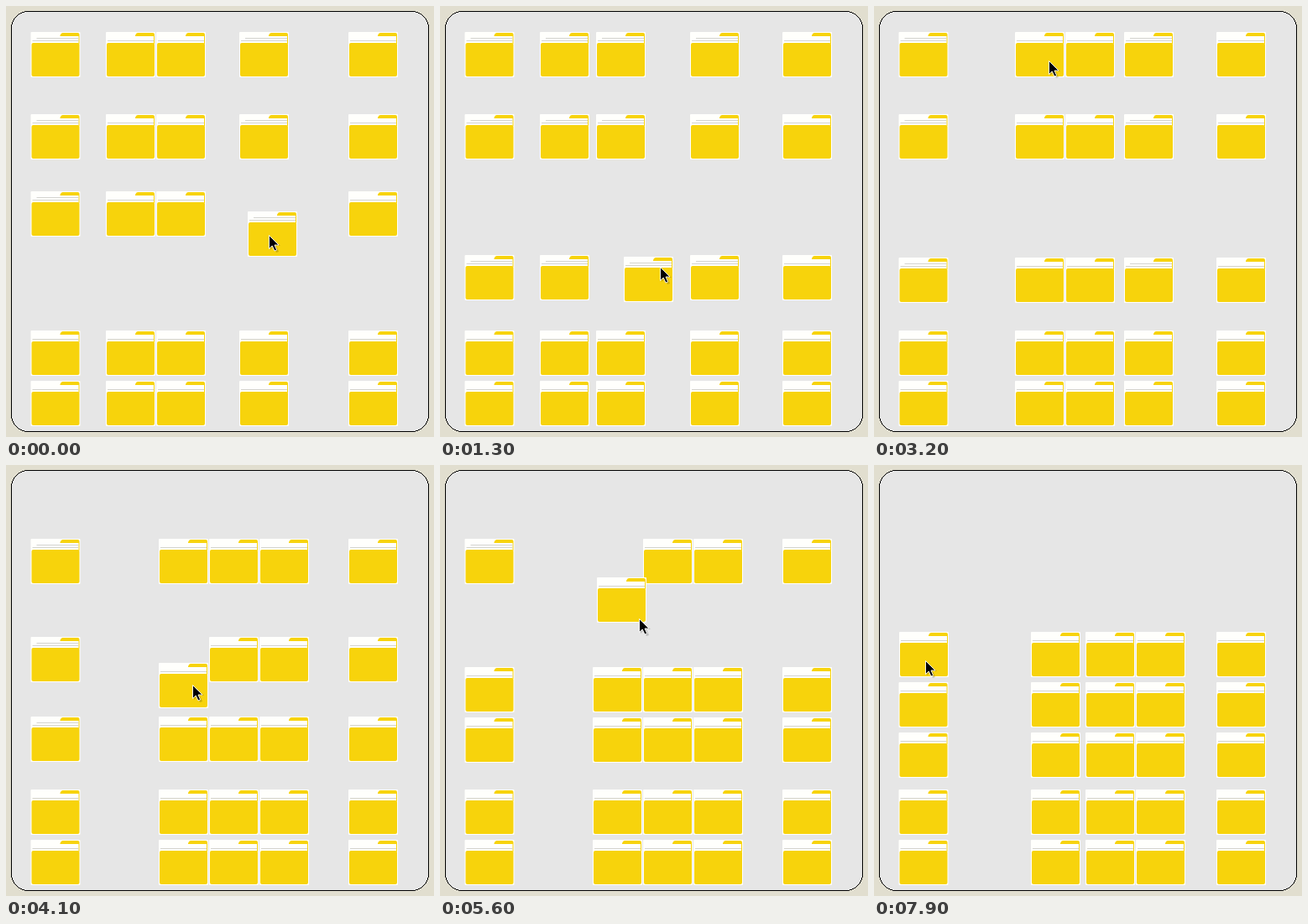
An HTML page that plays this animation: 510x514 px, repeating every 8 s.

```html
<!DOCTYPE html>
<html lang="en">
<head>
<meta charset="utf-8">
<title>Aligning folders</title>
<style>
html, body { margin: 0; width: 100%; height: 100%; overflow: hidden; background: #e1decf; }
svg { display: block; width: 100%; height: 100%; }
</style>
</head>
<body>
<svg viewBox="0 0 510 514" xmlns="http://www.w3.org/2000/svg">
  <defs>
    <g id="single">
      <rect x="-1" width="59" height="54" rx="1" fill="#fffffc"/>
      <path d="M34 4Q35 1 37 1H55Q57 1 57 3V14H56V5H34Z" fill="#f7d30c"/>
      <rect y="13" width="57" height="40" rx="2" fill="#f7d30c"/>
      <path d="M1 10.5H56" stroke="#d3d3cf"/>
    </g>
    <g id="stack">
      <use href="#single"/>
      <path d="M6 7.5H56" stroke="#d3d3cf"/>
    </g>
  </defs>
  <rect width="510" height="514" fill="#e1decf"/>
  <rect x="6.5" y="6.5" width="497" height="501" rx="20" fill="#e6e6e6" stroke="#000" shape-rendering="crispEdges"/>
  <g id="folders"></g>
  <g id="cursor">
    <path d="M2 2V18L6 14L9 21L12 20L9 13H14Z" opacity=".18"/>
    <path d="M.5 .5V16.5L4.2 13L7 19L9.6 17.9L7 12H12Z" stroke="#fff" stroke-width=".9"/>
  </g>
</svg>
<script>
const LOOP = 8000, STEP = 100, SIZE = 5, PITCH = 60;

// Each drag carries one folder; its row and column follow when it is dropped.
// The loop opens in the middle of the first drag.
const drags = [
  { start: 0, end: 500, cell: [2, 3], from: [289, 245], to: [299, 297], grip: [24, 28] },
  { start: 900, end: 1000, cell: [2, 2], to: [187, 297], grip: [42, 12] },
  { start: 1090, end: 1390, cell: [2, 2], to: [229, 300], grip: [42, 12] },
  { start: 2000, end: 2500, cell: [2, 1], to: [169, 300], grip: [39, 30] },
  { start: 3200, end: 3450, cell: [0, 1], to: [183, 88], grip: [39, 34] },
  { start: 3550, end: 3700, cell: [1, 1], to: [183, 205], grip: [39, 26] },
  { start: 3750, end: 4210, cell: [1, 1], to: [183, 241], grip: [39, 26] },
  { start: 5400, end: 5800, cell: [0, 1], to: [193, 180], grip: [49, 49] },
  { start: 6200, end: 6310, cell: [0, 1], to: [188, 199], grip: [41, 1] },
  { start: 7900, end: 8000, cell: [0, 0], to: [30.5, 199], grip: [30, 34] }
];

const mix = (a, b, k) => a.map((v, i) => v + (b[i] - v) * k);
const add = (a, b) => a.map((v, i) => v + b[i]);
const smooth = k => k * k * (3 - 2 * k);

// Moves one line and pushes the following ones so that folders never overlap
function shift(lines, index, value) {
  const next = [...lines];
  next[index] = value;
  for (let i = index + 1; i < SIZE; i++) next[i] = Math.max(next[i], next[i - 1] + PITCH);
  return next;
}

let layout = { cols: [30.5, 120, 180, 279, 409], rows: [31, 129, 221, 387, 447] };
for (const drag of drags) {
  const [row, col] = drag.cell, [x, y] = drag.to;
  drag.before = layout;
  drag.from ??= [layout.cols[col], layout.rows[row]];
  layout = { cols: shift(layout.cols, col, x), rows: shift(layout.rows, row, y) };
}

const isPacked = (lines, i) => i === SIZE - 1 ||
  [i - 1, i + 1].some(j => Math.abs(lines[j] - lines[i]) <= PITCH + 1);

const layer = document.getElementById("folders");
const cursor = document.getElementById("cursor");
const folders = Array.from({ length: SIZE * SIZE }, () =>
  layer.appendChild(document.createElementNS("http://www.w3.org/2000/svg", "use")));

function moveTo(node, point) {
  node.setAttribute("transform", `translate(${point.join(" ")})`);
}

function render(t) {
  const next = drags.findIndex(d => t < d.end);
  const drag = drags[next], last = drags[next - 1];
  const { cols, rows } = drag.before;
  const held = t >= drag.start;

  let heldAt, pointer;
  if (held) {
    const k = smooth((t - drag.start) / (drag.end - drag.start));
    heldAt = mix(drag.from, drag.to, k).map(Math.round);
    pointer = add(heldAt, drag.grip);
  } else {
    const k = (t - last.end) / (drag.start - last.end);
    pointer = mix(add(last.to, last.grip), add(drag.from, drag.grip), k).map(Math.round);
  }

  folders.forEach((node, i) => {
    const row = Math.floor(i / SIZE), col = i % SIZE;
    const loose = !isPacked(rows, row) && !isPacked(cols, col);
    const lifted = held && row === drag.cell[0] && col === drag.cell[1];
    node.setAttribute("href", loose ? "#stack" : "#single");
    moveTo(node, lifted ? heldAt : [cols[col], rows[row]]);
    if (lifted && node !== layer.lastChild) layer.append(node);
  });
  moveTo(cursor, pointer);
}

const start = performance.now();
function tick(now) {
  const t = Math.max(0, now - start) % LOOP;
  render(Math.floor(t / STEP) * STEP);
  requestAnimationFrame(tick);
}
render(0);
requestAnimationFrame(tick);
</script>
</body>
</html>
```
